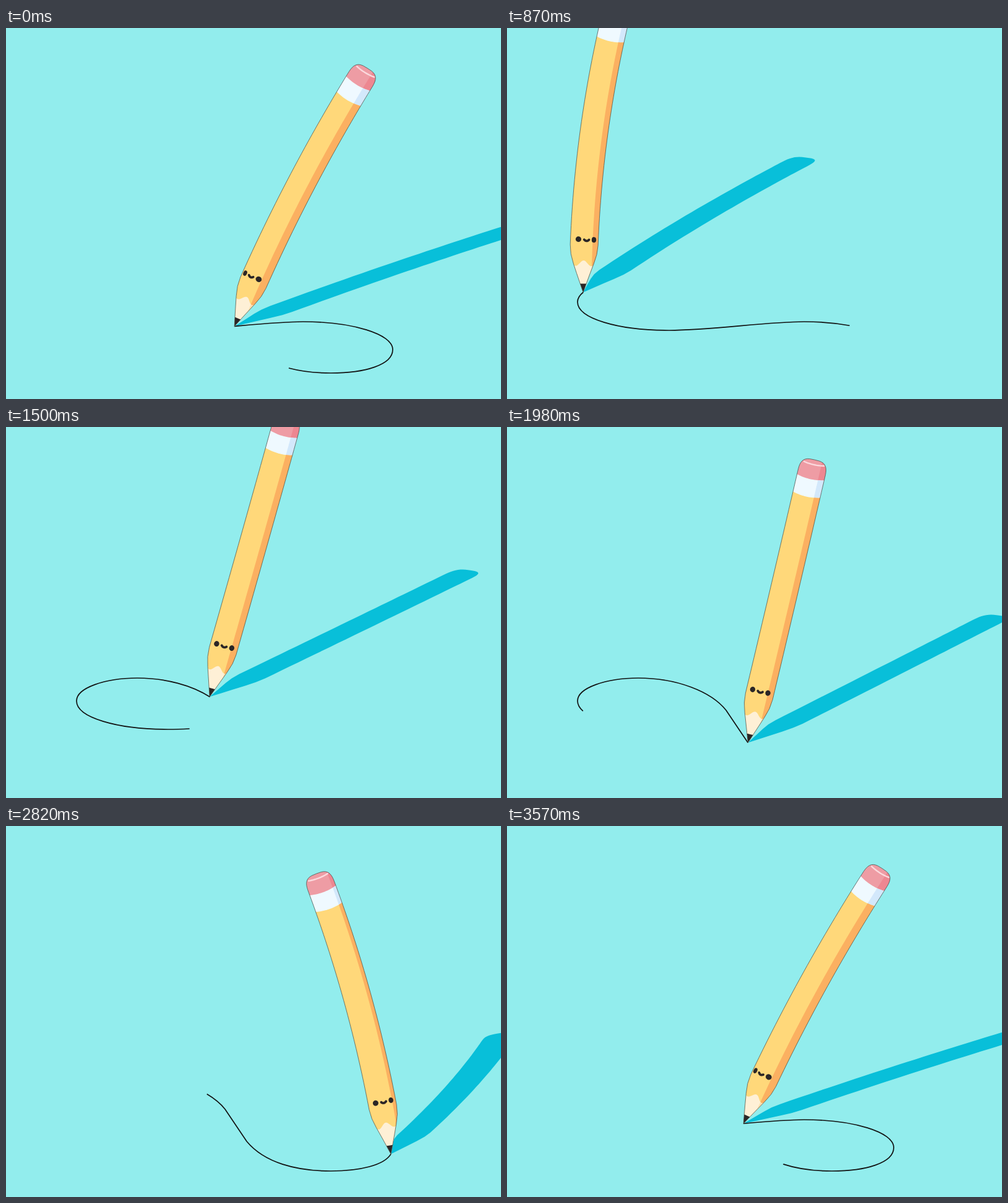
An HTML page for the animation above (3600 ms loop, 800 by 600 pixels).

```html
<!DOCTYPE html>
<html lang="en">
<head>
<meta charset="utf-8">
<title>Drawing pencil</title>
<style>
html, body { margin: 0; width: 100%; height: 100%; overflow: hidden; background: #92eded; }
svg { display: block; width: 100vw; height: 100vh; }
</style>
</head>
<body>
<svg id="stage" viewBox="0 0 800 600">
  <path id="shadow" fill="#08bfd9"/>
  <path id="trail" fill="none" stroke="#111" stroke-width="1.7" d="M354 458L389 510C418 545 470 558 525 558C580 558 625 545 625 520C625 495 560 475 480 475C420 475 330 489 262 489C180 489 114 470 114 443C114 422 160 406 212 406C275 406 330 428 354 458"/>
  <g id="pencil"></g>
</svg>
<script>
const LOOP = 3600, STEP = 30, LAP = 1129;
const LEN = 470, R = 22.5, RAD = Math.PI / 180;

// time, pen position, line end, angle at the tip, angle at the eraser, face turn, shadow height
const KEYS = [
  [0, 594, 142, 22.5, 32, -.34, .40],
  [540, 827, 320, 9, 21, -.05, .45],
  [870, 882, 410, 0, 14, .16, .468],
  [1080, 947, 492, 6, 16, .12, .465],
  [1500, 1096, 666, 16, 15.5, 0, .452],
  [1620, 1134, 715, 15.5, 15, 0, .452],
  [1980, 1192, 844, 13.5, 13, 0, .45],
  [2160, 1244, 874, 1, -5, .08, .46],
  [2550, 1380, 1011, -21, -34, .26, .427],
  [2700, 1411, 1061, -17, -31, .24, .43],
  [3120, 1528, 1158, 14, 9, -.2, .437],
  [3240, 1573, 1187, 19, 25, -.28, .42],
  [3570, 1710, 1260, 24, 33, -.36, .385]
];

function key(i) {
  const n = KEYS.length, turn = Math.floor(i / n), k = KEYS[i - turn * n].slice();
  k[0] += turn * LOOP;
  k[1] += turn * LAP;
  k[2] += turn * LAP;
  return k;
}

// smooth cubic through the keys
function sample(t) {
  let i = KEYS.length - 1;
  while (KEYS[i][0] > t) i--;
  const [a, b, c, d] = [i - 1, i, i + 1, i + 2].map(key);
  const h = c[0] - b[0], x = (t - b[0]) / h;
  return b.map((v, j) => {
    const m0 = (c[j] - a[j]) / (c[0] - a[0]) * h;
    const m1 = (d[j] - v) / (d[0] - b[0]) * h;
    return v + x * (m0 + x * (3 * (c[j] - v) - 2 * m0 - m1 + x * (2 * (v - c[j]) + m0 + m1)));
  });
}

// half width of the pencil at distance u from its tip
function half(u) {
  if (u < 50) return u * .355;
  if (u < 78) { const x = (u - 50) / 28; return 17.75 + 9.5 * x - 4.75 * x * x; }
  if (u < 446) return R;
  return R * Math.max(0, 1 - ((u - 446) / 24) ** 3) ** .3;
}

const bow = v => -3 * (1 - (v / R) ** 2);
const scallop = v => 2 + 4.5 * Math.cos(v * .25);
const flat = () => 0;

// the part from the tip up to `end`, right of `lo`, with a shaped upper edge
function layer(end, lo, edge) {
  const left = [], right = [], top = [], n = 48;
  for (let i = 0; i <= n; i++) {
    const u = end * Math.sin(i / n * Math.PI / 2), h = half(u);
    left.push([u, Math.min(h, Math.max(lo, -h))]);
    right.unshift([u, h]);
  }
  left.pop();
  right.shift();
  const h = half(end), l = Math.min(h, Math.max(lo, -h));
  for (let i = 0; i <= 20; i++) {
    const v = l + (h - l) * i / 20;
    top.push([end + edge(v), v]);
  }
  return left.concat(top, right);
}

const svg = document.getElementById("stage");
const shadow = document.getElementById("shadow");
const trail = document.getElementById("trail");
const pencil = document.getElementById("pencil");
const total = trail.getTotalLength(), unit = total / LAP;

function add(tag, attrs) {
  const el = document.createElementNS(svg.namespaceURI, tag);
  for (const k in attrs) el.setAttribute(k, attrs[k]);
  return pencil.appendChild(el);
}

const parts = [
  [LEN, flat, "#ee9ca4", "#ed8791"],
  [441, bow, "#eff9ff", "#d3e8fb"],
  [412, bow, "#ffd87a", "#fbb061"],
  [45, scallop, "#fef0d6", "#fde0ae"],
  [14, flat, "#2b2626", "#1f1b1b"]
].map(([end, edge, main, dark]) => ({
  end, edge,
  pts: layer(end, -99, edge),
  main: add("path", { fill: main }),
  dark: add("path", { fill: dark })
}));
const shine = add("path", { fill: "none", stroke: "#fbd9dd", "stroke-width": 2.4, "stroke-linecap": "round" });
const rim = add("path", { fill: "none", stroke: "#33453f", "stroke-width": .8, "stroke-opacity": .85 });
const eyes = [-.6, .6].map(at => ({ at, el: add("ellipse", { fill: "#2b2626" }) }));
const mouth = add("path", { fill: "none", stroke: "#2b2626", "stroke-width": 3.8, "stroke-linecap": "round" });

const shinePts = [];
for (let v = -16; v <= 17; v += 3) shinePts.push([465 + bow(v), v]);

const pathOf = (pts, map) => "M" + pts.map(p => map(...p).map(n => n.toFixed(2)).join(" ")).join("L");

function draw(t) {
  const [, head, tail, base, top, turn, rise] = sample(t);
  const tip = trail.getPointAtLength(head % LAP * unit);
  const angle = u => (base + (top - base) * u / LEN) * RAD;

  // bent centre line, relative to the tip
  const bend = (u, v) => {
    const a = angle(u), d = (a - base * RAD) / 2, m = base * RAD + d;
    const c = Math.abs(d) < 1e-6 ? u : u * Math.sin(d) / d;
    return [c * Math.sin(m) + v * Math.cos(a), -c * Math.cos(m) + v * Math.sin(a)];
  };
  const place = (u, v) => {
    const [x, y] = bend(u, v);
    return [tip.x + x, tip.y + y];
  };
  const lean = (base + top) / 2, wide = 1.17 + .0045 * lean;
  const cast = (u, v) => {
    const [x, y] = bend(u, v * wide);
    return [tip.x + .97 * x - .658 * y, tip.y + rise * y];
  };

  const body = parts[0].pts;
  shadow.setAttribute("d", pathOf(body, cast) + "Z");
  rim.setAttribute("d", pathOf(body, place) + "Z");
  shine.setAttribute("d", pathOf(shinePts, place));

  const lo = R - 8 - .14 * lean;
  for (const p of parts) {
    p.main.setAttribute("d", pathOf(p.pts, place) + "Z");
    p.dark.setAttribute("d", pathOf(layer(p.end, lo, p.edge), place) + "Z");
  }

  const line = (head - tail) * unit;
  trail.setAttribute("stroke-dasharray", line + " " + (total - line));
  trail.setAttribute("stroke-dashoffset", -(tail % LAP) * unit);

  const open = Math.min(1, Math.max(.18, Math.abs(t - 3120) / 60 - .5));
  const tilt = angle(85) / RAD;
  for (const { at, el } of eyes) {
    const [x, y] = place(85.5, R * Math.sin(turn + at));
    el.setAttribute("rx", 5.1 * Math.cos(turn + at));
    el.setAttribute("ry", 4.5 * open);
    el.setAttribute("transform", `translate(${x} ${y}) rotate(${tilt})`);
  }
  const smile = [];
  for (let x = -1; x <= 1; x += .25) {
    smile.push([83.2 + 2 * x * x, R * Math.sin(turn) + 4 * x * Math.cos(turn)]);
  }
  mouth.setAttribute("d", pathOf(smile, place));
}

let start;
function tick(now) {
  if (start === undefined) start = now;
  const t = (now - start) % LOOP;
  draw(t - t % STEP);
  requestAnimationFrame(tick);
}
draw(0);
requestAnimationFrame(tick);
</script>
</body>
</html>
```
